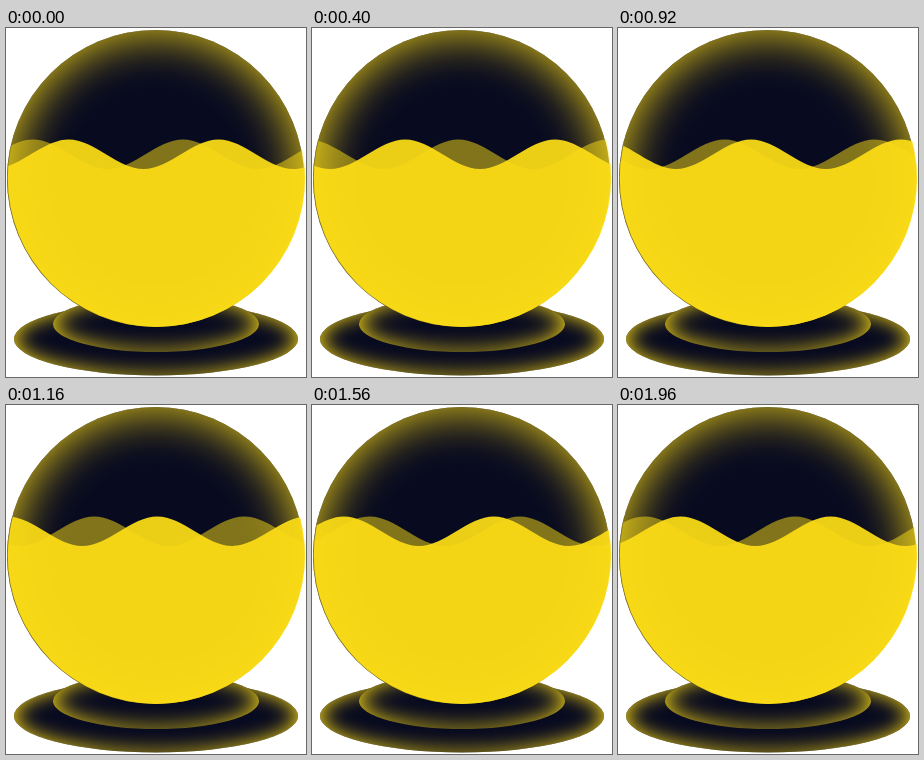
These frames come from a looping animation (300 px wide and 349 px high, 2 s). An HTML page:

```html
<!DOCTYPE html>
<html lang="en">
<head>
<meta charset="utf-8">
<title>Liquid orb</title>
<style>
  html, body { margin: 0; width: 100%; height: 100%; overflow: hidden; background: #fff; }
  .glow {
    position: absolute;
    border-radius: 50%;
    background: #080a20;
    box-shadow: inset 0 0 var(--blur) #f4d516;
  }
  .base { left: 8px; top: 169px; width: 284px; height: 284px; --blur: 40px; transform: scaleY(.257); }
  .step { left: 47px; top: 193px; width: 206px; height: 206px; --blur: 40px; transform: scaleY(.272); }
  .orb { left: 1px; top: 2px; width: 297px; height: 297px; --blur: 50px; }
  svg { position: absolute; left: 0; top: 0; }
</style>
</head>
<body>
<div class="glow base"></div>
<div class="glow step"></div>
<div class="glow orb"></div>
<svg width="300" height="349" viewBox="0 0 300 349">
  <clipPath id="bowl"><circle cx="150.4" cy="150.3" r="148.6"/></clipPath>
  <g clip-path="url(#bowl)" fill="#fcdd16">
    <path id="back" opacity=".5"/>
    <path id="front" opacity=".93"/>
  </g>
</svg>
<script>
  const LOOP = 2000, STEP = 40, LAST = LOOP / STEP - 1;
  const WAVELENGTH = 150, CREST = 111.5, HEIGHT = 29.5;
  const back = document.getElementById('back');
  const front = document.getElementById('front');

  const half = WAVELENGTH / 2, pull = half * 30 / 88;
  const swing = dy => `c${pull} 0 ${half - pull} ${dy} ${half} ${dy}`;
  const cycle = swing(HEIGHT) + swing(-HEIGHT);
  // The path starts on a crest at x = 0.
  const wave = `M0 ${CREST}${cycle.repeat(4)}V349H0Z`;
  back.setAttribute('d', wave);
  front.setAttribute('d', wave);

  function place(path, crestX) {
    const x = crestX % WAVELENGTH - WAVELENGTH;
    path.setAttribute('transform', `translate(${x} 0)`);
  }

  function draw(now) {
    const shift = Math.floor(now % LOOP / STEP) / LAST * WAVELENGTH;
    place(front, 62.5 + shift);
    place(back, 177 - shift);
    requestAnimationFrame(draw);
  }
  draw(0);
</script>
</body>
</html>
```
